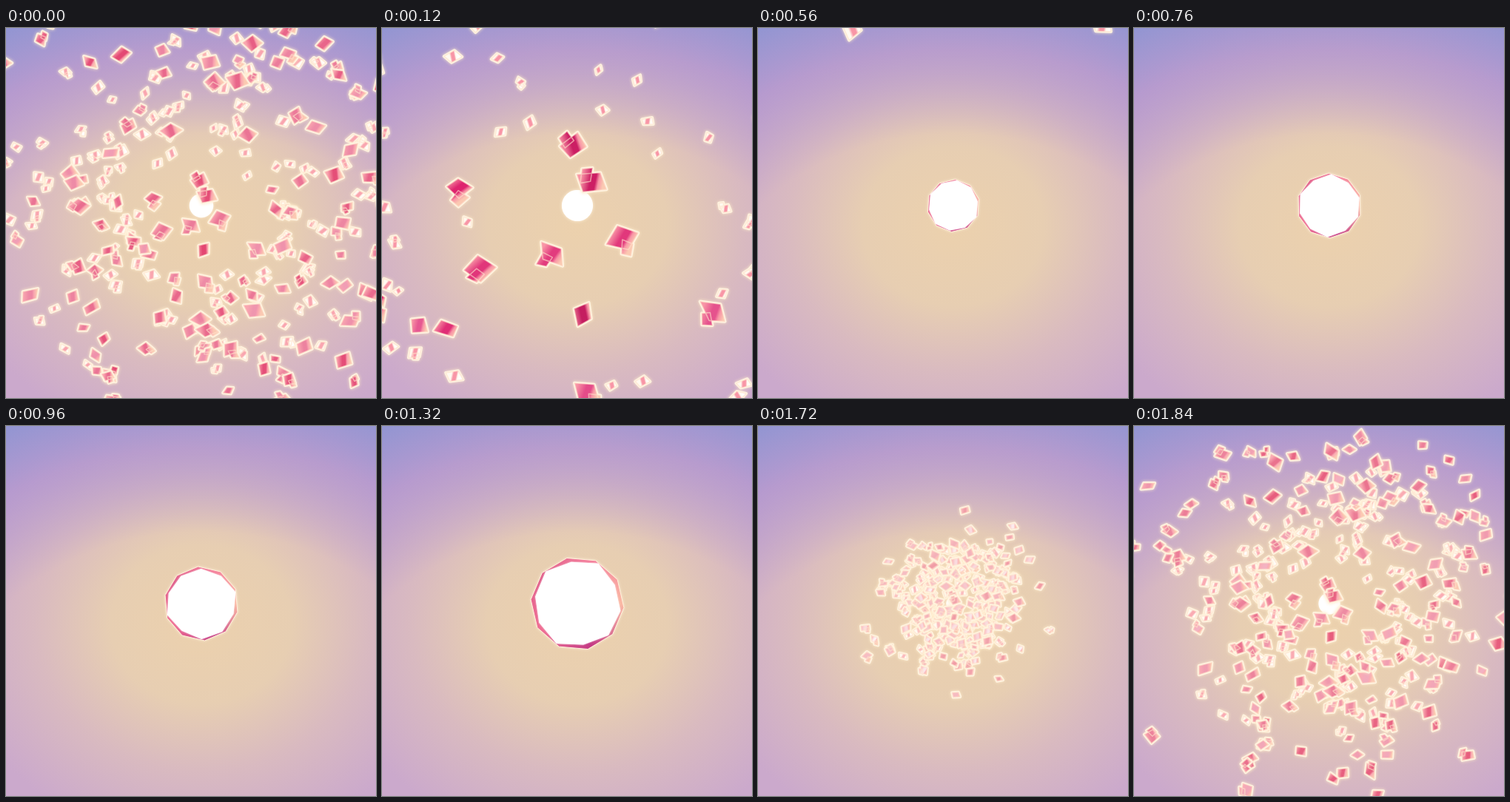
Write an HTML page with a canvas that moves like this. It is 500 px wide and 500 px high and loops after 1920 ms.

```html
<!DOCTYPE html>
<html lang="en">
<head>
<meta charset="utf-8">
<title>Bursting sphere</title>
<style>
  html, body { margin: 0; width: 100%; height: 100%; overflow: hidden; }
  body {
    background:
      radial-gradient(ellipse 520px 420px at 264px 420px, rgba(180,150,208,0) 66%, rgba(174,148,208,.72) 93%, #9095d2 113%),
      radial-gradient(ellipse 340px 300px at 264px 268px, #ecd1ad 0, #e7ceb2 36%, #d9bac0 66%, #cba9cc 100%);
  }
  canvas { display: block; width: 500px; height: 500px; }
</style>
</head>
<body>
<canvas id="stage" width="500" height="500"></canvas>
<script>
const ctx = document.getElementById('stage').getContext('2d');
const LOOP = 1920, TICK = 40, STEPS = 41, BURST = 37, LAST_AGE = 17;
const CX = 264, CY = 240, TAU = Math.PI * 2;

// Offsets from the centre, four steps after the burst
const NEAR = [[5, 103], [75, 59], [-65, -10], [-54, 35], [3, 60], [-14, 27], [25, 18], [-2, -33], [8, -13]];
const FAR = [[-40, -70], [59, -71]];

let seed = 71;
function rand(min = 0, max = 1) {
  seed = (seed * 16807) % 2147483647;
  return min + (max - min) * seed / 2147483647;
}

// A tilted box face: a parallelogram with slightly uneven corners
function face(x, y, w, h) {
  const skew = rand(-.22, .22);
  return [[-1, -1], [1, -1], [1, 1], [-1, 1]].map(([sx, sy]) => [
    x + sx * w / 2 + sy * skew * h + rand(-.07, .07),
    y + sy * h / 2 + rand(-.07, .07)
  ]);
}

function makeShape(split) {
  const faces = [face(0, 0, rand(.75, 1.15), rand(.55, .95))];
  if (rand() < split) faces.push(face(rand(-.5, .5), rand(.25, .5) * (rand() < .5 ? -1 : 1), .5, .6));
  return faces;
}

function makeShard(x, y, spread, size, pale, split = .4) {
  return { x, y, spread, size, pale, shape: makeShape(split),
    angle: rand(-.75, .6), spin: rand(-.07, .07), depth: rand() };
}

function polarShard(angle, d, ...rest) {
  return makeShard(Math.cos(angle) * d * 1.05, Math.sin(angle) * d, ...rest);
}

function outerShard(i) {
  const a = rand(0, TAU), pale = rand() < .42;
  if (i % 9 === 0) return polarShard(a, rand(280, 520), 2.8, rand(14, 20), false);
  return pale
    ? polarShard(a, 98 + 165 * rand(), rand(2, 2.9), rand(9, 14), true)
    : polarShard(a, 90 + 250 * rand(), rand(2.5, 3), rand(12, 19), false);
}

const back = Array.from({ length: 9 }, () =>
  polarShard(rand(Math.PI * .95, TAU * 1.05), rand(65, 115), 1.75, 10, true));
FAR.forEach(([x, y]) => back.push(makeShard(x, y, 1.6, 12, true)));
const outer = Array.from({ length: 280 }, (_, i) => outerShard(i)).sort((a, b) => b.pale - a.pale);
const near = NEAR.map(([x, y]) => makeShard(x, y, 2.45, 19, false, .8));

// Distant shards drift evenly, the others rush past the camera
function travel(s, age) {
  const e = (age - 4) / 3;
  if (s.spread < 1.7) return 1 + (s.spread - 1) * e;
  return s.spread ** (e + .06 * Math.max(0, age - 7) ** 2);
}

function fillFor(s, w, age) {
  const heat = Math.min(1, (age + 1) / 8);
  const light = `hsl(${358 - 8 * heat} 88% ${87 - 9 * heat}%)`;
  const core = `hsl(${356 - 20 * heat} 74% ${82 - 38 * heat + (1 - s.depth) * 20}%)`;
  const g = ctx.createLinearGradient(-w / 2, -w * .15, w / 2, w * .15);
  const edge = s.pale ? '#fffaf0' : light;
  g.addColorStop(s.pale ? .25 : 0, edge);
  g.addColorStop(.42, s.pale ? light : core);
  g.addColorStop(.64, s.pale ? light : core);
  g.addColorStop(.78, edge);
  g.addColorStop(1, s.pale ? '#fff' : '#fbc9b2');
  return g;
}

function trace(points) {
  points.forEach(([x, y], i) => i ? ctx.lineTo(x, y) : ctx.moveTo(x, y));
  ctx.closePath();
}

function outline(color, width) {
  ctx.strokeStyle = color;
  ctx.lineWidth = width;
  ctx.stroke();
}

function drawShard(s, age) {
  const k = travel(s, age), x = CX + s.x * k, y = CY + s.y * k;
  const size = s.size * (s.pale ? 1.05 : 1.16) ** (age - 4);
  if (x < -size || y < -size || x > 500 + size || y > 500 + size) return;
  ctx.save();
  ctx.translate(x, y);
  ctx.rotate(s.angle + s.spin * (age - 4));
  ctx.beginPath();
  s.shape.forEach(f => trace(f.map(([px, py]) => [px * size, py * size])));
  ctx.lineJoin = 'round';
  ctx.shadowColor = '#ffeccb';
  ctx.shadowBlur = 4;
  outline('rgba(255,246,228,.95)', 4);
  ctx.shadowBlur = 0;
  ctx.fillStyle = fillFor(s, size, age);
  ctx.fill();
  outline('rgba(255,226,204,.6)', 1.6);
  ctx.restore();
}

function ring(n, turn, radius) {
  ctx.beginPath();
  trace(Array.from({ length: n }, (_, i) => {
    const a = turn + i * TAU / n, r = radius(i);
    return [CX + Math.cos(a) * r, CY + Math.sin(a) * r];
  }));
}

function drawSphere(step) {
  const r = 15.7 + 1.62 * step;
  const turn = -(step + 74) * Math.PI / 180;
  const rim = Math.max(0, .2 * (step - 5));
  const g = ctx.createConicGradient(0, CX, CY);
  ['#fbb9a4', '#c43a84', '#ef6f94', '#e0608c', '#f47f9c', '#fbb9a4']
    .forEach((color, i, all) => g.addColorStop(i / (all.length - 1), color));
  ctx.save();
  ctx.shadowColor = '#fff0d8';
  ctx.shadowBlur = 4;
  ring(rim ? 10 : 60, turn, () => r + .5);
  ctx.fillStyle = rim ? g : '#fff';
  ctx.fill();
  if (rim) {
    ctx.shadowBlur = 0;
    outline('#fff0dc', 1);
    ctx.clip();
    ring(10, turn + .08, i => r - rim * (.85 + .55 * Math.sin(i * 2.4 + step * .3)));
    ctx.shadowColor = '#fff';
    ctx.shadowBlur = 2;
    ctx.fillStyle = '#fff';
    ctx.fill();
  }
  ctx.restore();
}

function draw(time) {
  const slot = Math.floor((time % LOOP) / TICK);
  const step = Math.ceil(STEPS * (slot + 1) / (LOOP / TICK)) - 1;
  const burst = step >= BURST;
  const age = burst ? step - BURST : step + STEPS - BURST;
  const drawAll = shards => { if (age <= LAST_AGE) shards.forEach(s => drawShard(s, age)); };
  ctx.clearRect(0, 0, 500, 500);
  drawAll(back);
  drawAll(outer);
  drawSphere(burst ? step - STEPS : step);
  drawAll(near);
}

const start = performance.now();
function loop() {
  draw(performance.now() - start);
  requestAnimationFrame(loop);
}
loop();
</script>
</body>
</html>
```
